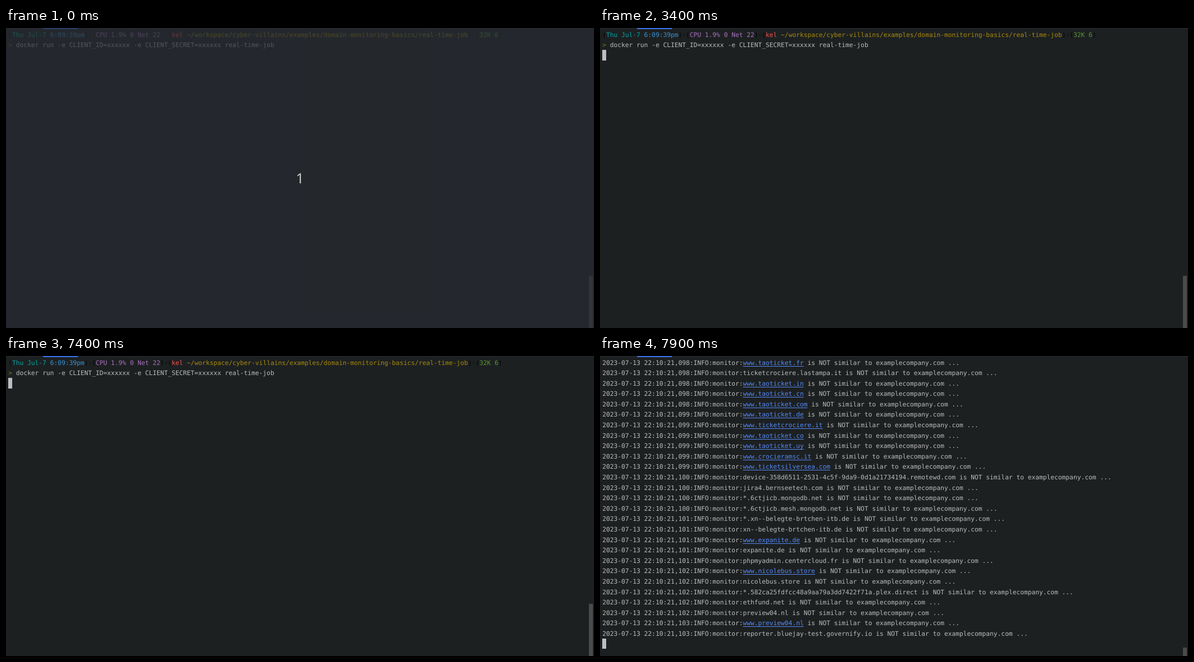
An HTML page for the animation above (8 s loop, 1047 by 535 pixels).

```html
<!DOCTYPE html>
<html lang="en">
<head>
<meta charset="utf-8">
<title>Real-time monitoring job</title>
<style>
  html, body { margin: 0; width: 100%; height: 100%; overflow: hidden; background: #1d2021; }

  #stage {
    position: relative; width: 1047px; height: 535px; overflow: hidden;
    background: #1d2021; color: #bbb;
    font: 11.241px/18.6px "DejaVu Sans Mono", monospace;
    font-variant-ligatures: none;
    text-rendering: geometricPrecision;
    white-space: pre;
  }
  #stage > div { position: absolute; }

  .screen { inset: 0; box-sizing: border-box; padding: 3.5px 0 0 4.2px; background: #1d2021; }
  .row { height: 18.6px; }
  .thumb { position: absolute; left: 1038px; top: var(--top); bottom: 0; width: 7px; background: #4b4b4a; }

  .black { color: #000; }
  .cyan { color: #00a3a3; }
  .blue { color: #3993d4; }
  .purple { color: #a771bf; }
  .red { color: #f0524f; }
  .yellow { color: #a68a0d; }
  .green { color: #5c962c; }
  .arrow { color: #6f7f1f; }
  .link {
    color: #548af7;
    text-decoration: underline 1px;
    text-underline-offset: 2px;
    text-decoration-skip-ink: none;
  }

  #edge { left: 0; top: 0; width: 100%; height: 1px; background: #2a2d2f; }
  #tab { left: 66px; top: 0; width: 62px; height: 2px; background: #3574f0; }
  #cursor { left: 4px; top: 39px; width: 7px; height: 19px; background: #bcbec4; animation: cursor 8s step-end infinite; }

  #shade { inset: 0; background: rgba(40, 44, 52, .71); animation: shade 8s step-end infinite; }
  #count {
    left: 0; top: 250px; width: 100%; text-align: center;
    font: 25px/36px "Noto Sans", "Open Sans", sans-serif; color: #c3c8c6;
    animation: shade 8s step-end infinite;
  }

  #log0 { animation: log0 8s step-end infinite; }
  #log1 { animation: log1 8s step-end infinite; }
  #log2 { animation: log2 8s step-end infinite; }

  @keyframes shade { 0% { visibility: visible; } 1.25%, 100% { visibility: hidden; } }
  @keyframes log0 { 0% { visibility: hidden; } 96.25%, 100% { visibility: visible; } }
  @keyframes log1 { 0% { visibility: hidden; } 97.5%, 100% { visibility: visible; } }
  @keyframes log2 { 0% { visibility: hidden; } 98.75%, 100% { visibility: visible; } }

  /* waits after the command, blinks on the next line, then sits below the log */
  @keyframes cursor {
    0% { opacity: 0; left: 478px; top: 20px; height: 19px; }
    1.25% { opacity: 1; left: 478px; top: 20px; height: 19px; }
    8.75% { opacity: 0; left: 4px; top: 39px; height: 19px; }
    10%, 30%, 42.5%, 55%, 67.5%, 80%, 92.5% { opacity: 1; left: 4px; top: 39px; height: 19px; }
    21.25%, 36.25%, 48.75%, 61.25%, 73.75%, 86.25% { opacity: 0; left: 4px; top: 39px; height: 19px; }
    96.25%, 100% { opacity: 1; left: 4px; top: 504px; height: 18px; }
  }
</style>
</head>
<body>
<div id="stage">
  <div class="screen" style="--top:442px"><div class="row black">(<span class="cyan">Thu Jul-7</span> <span class="blue">6:09:39pm</span>)-(<span class="purple">CPU 1.9% 0 Net 22</span>)-(<span class="red">kel</span> <span class="yellow">~/workspace/cyber-villains/examples/domain-monitoring-basics/real-time-job</span>)-(<span class="green">32K 6</span>)</div><div class="row"><span class="arrow">&gt;</span> docker run -e CLIENT_ID=xxxxxx -e CLIENT_SECRET=xxxxxx real-time-job</div><div class="thumb"></div></div>
  <div class="screen" id="log0" style="--top:467px"></div>
  <div class="screen" id="log1" style="--top:510px"></div>
  <div class="screen" id="log2" style="--top:520px"></div>
  <div id="edge"></div>
  <div id="tab"></div>
  <div id="cursor"></div>
  <div id="shade"></div>
  <div id="count">1</div>
</div>
<script>
  const cloud = "dom4gjrdzw6.ap-northeast-3.aws.confluent.cloud";
  const hash = "502fe56a6f5e49e18d5d8eb12e444a74.int.sea.cc.";
  const parse = text => text.trim().split("\n").map(line => line.trim().split(" "));

  // each line: milliseconds, domain
  const early = parse(`
    777 *.${cloud}
    778 *.apne3-az2.${cloud}
    779 *.apne3-az3.${cloud}
    779 www.bidera.com
    779 bidera.com
    780 auctioncars.com
    780 www.auctioncars.com
    780 *.industrialplasticparts.in
    781 industrialplasticparts.in
    781 xn--90agqcrnt5a.xn--p1ai
    782 www.xn--90agqcrnt5a.xn--p1ai
    782 www.thesparrownest.bestbuydownload.com
    783 thesparrownest.bestbuydownload.com
    784 sberbank.sber.sberbank.pay.avito.sberbank.kwid9.gorsky.top
    785 www.sberbank.sber.sberbank.pay.avito.sberbank.kwid9.gorsky.top
    785 wssajjobe.shop
    785 *.wssajjobe.shop
    786 *.${cloud}
    787 *.apne3-az3.${cloud}
    788 *.apne3-az1.${cloud}
    789 *.apne3-az2.${cloud}
    790 ${hash}arc.azure.net
    790 *.${hash}arconazure.com
    791 *.${hash}arc.azure.net
    792 00dfa48b74e2433e9af9f5014f20360d.cc.arc.azure.net
    792 pay.sber.sberbank.pay.pay.orjq3mft9iwid5h.bot.hugelwerk.com
    793 www.pay.sber.sberbank.pay.pay.orjq3mft9iwid5h.bot.hugelwerk.com`);

  const late = parse(`
    098 www.taoticket.fr
    098 ticketcrociere.lastampa.it
    098 www.taoticket.in
    098 www.taoticket.cn
    098 www.taoticket.com
    099 www.taoticket.de
    099 www.ticketcrociere.it
    099 www.taoticket.co
    099 www.taoticket.uy
    099 www.crocieramsc.it
    099 www.ticketsilversea.com
    100 device-358d6511-2531-4c5f-9da9-0d1a21734194.remotewd.com
    100 jira4.bernseetech.com
    100 *.6ctjicb.mongodb.net
    100 *.6ctjicb.mesh.mongodb.net
    101 *.xn--belegte-brtchen-itb.de
    101 xn--belegte-brtchen-itb.de
    101 www.expanite.de
    101 expanite.de
    101 phpmyadmin.centercloud.fr
    102 www.nicolebus.store
    102 nicolebus.store
    102 *.582ca25fdfcc48a9aa79a3dd7422f71a.plex.direct
    102 ethfund.net
    102 preview04.nl
    103 www.preview04.nl
    103 reporter.bluejay-test.governify.io`);

  // the log rushing past in between
  const middle = late.map((row, i) => [940 + Math.floor(i / 2), (i % 2 ? row : early[i])[1]]);

  function fill(id, second, rows) {
    const lines = rows.map(([ms, domain]) => {
      const name = domain.startsWith("www.") ? `<span class="link">${domain}</span>` : domain;
      return `<div class="row">2023-07-13 22:10:${second},${ms}:INFO:monitor:${name} is NOT similar to examplecompany.com ...</div>`;
    });
    document.getElementById(id).innerHTML = lines.join("") + '<div class="thumb"></div>';
  }

  fill("log0", 20, early);
  fill("log1", 20, middle);
  fill("log2", 21, late);
</script>
</body>
</html>
```
